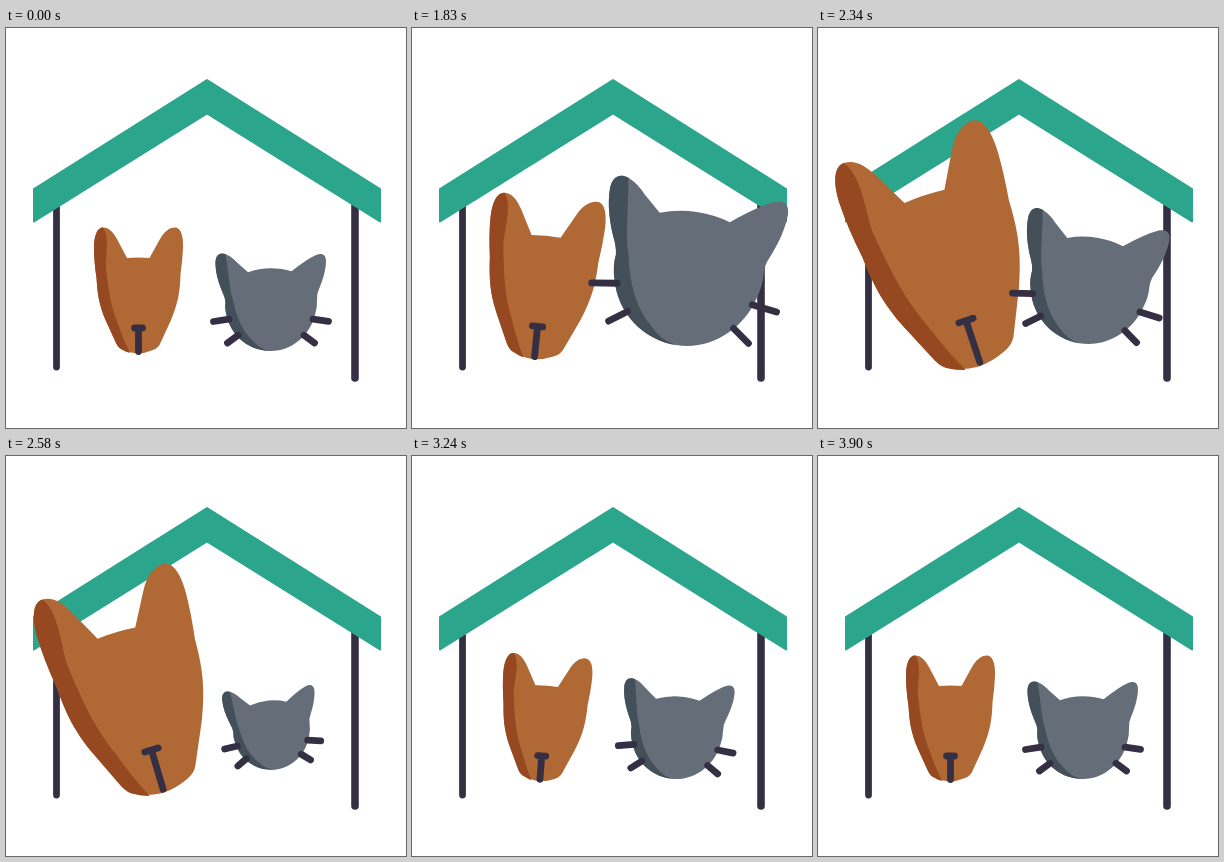
Animation of 400 by 400 pixels, one loop 3.93 s. Source, as an HTML page:

```html
<!DOCTYPE html>
<html lang="en">
<head>
<meta charset="utf-8">
<title>Pet shelter</title>
<style>
  html, body { margin: 0; width: 100%; height: 100%; overflow: hidden; background: #fff; }
  svg { display: block; width: 100vw; height: 100vh; }
  .line { fill: none; stroke: #352f44; stroke-width: 6.8; stroke-linecap: round; vector-effect: non-scaling-stroke; }
  .right { stroke-width: 7.6; }
</style>
</head>
<body>
<svg viewBox="0 0 400 400">
  <path class="line" d="M50.5 175V339"/>
  <path class="line right" d="M349 175V350"/>
  <path fill="#2ca58d" stroke="#2ca58d" stroke-width="2" stroke-linejoin="round"
    d="M201 52L374 161V193.500L201 85.300L28 193.500V161Z"/>
  <g id="dog">
    <path fill="#b06835" d="M97 199.500C103 199.500 107 204 111 211L121 230Q132 229 143.500 230L154 211C158 204 163 199.500 169 199.500C174.500 199.500 177.500 207 177 220Q176.500 232 174.500 246C174 264 172 275 165 292L154 316Q152 320 147 322Q139 325.500 131 325.500Q123 325 116 321.500Q112.500 320 110 315L100 293C93 277 91.500 266 90.500 250Q88 233 88 220C88 207 91.500 199.500 97 199.500Z"/>
    <path fill="#964820" d="M97 199.500C91.500 199.500 88 207 88 220Q88 233 90.500 250C91.500 266 93 277 100 293L110 315Q112.500 320 116 321.500Q119 323.500 124 325Q118 313 112 296C105 279 102.500 263 100 240C99.500 228 104 209 97 199.500Z"/>
    <path class="line" d="M128.500 300H136.500M132.500 300V323.500"/>
  </g>
  <g id="cat">
    <path fill="#656e78" d="M216 225.500C221 225.500 227 230 231 234.500L242 244.300Q253 240.300 264.500 240.300Q276 240.300 285.500 243.300Q301 231 310 227C316 224.500 320 226.500 320 233C320 241 317 252 313 261Q310.500 266 311 272Q311.500 279 309 287C304 307 286 323 265 323C244 323 226 309 221 289Q218.500 281 219.500 274Q219 269 216 263C212 253 209.500 244 209.500 235C209.500 229 212 225.500 216 225.500Z"/>
    <path fill="#434f59" d="M216 225.500C212 225.500 209.500 229 209.500 235C209.500 244 212 253 216 263Q219 269 219.500 274Q218.500 281 221 289C226 309 244 323 265 323Q255 322 247 313C236 303 230 288 227 272C223 260 223 246 219.500 226Z"/>
    <path class="line" d="M207.500 293.500L223 291.200M221.500 315L232 307.300M307 291.200L322.500 293.300M298 307.300L308.500 315"/>
  </g>
</svg>
<script>
  const LOOP = 3930, HOLD = 1530, STEP = 30;
  const dog = document.getElementById('dog');
  const cat = document.getElementById('cat');

  // Eased 0 to 1 between steps a and b.
  function ease(n, a, b) {
    const u = Math.min(1, Math.max(0, (n - a) / (b - a)));
    return u * u * (3 - 2 * u);
  }

  // Place a head by its centre, turned and scaled about it.
  function pose(pet, cx, cy, dx, dy, turn, size) {
    pet.setAttribute('transform',
      `translate(${cx + dx} ${cy + dy}) rotate(${turn}) scale(${size}) translate(${-cx} ${-cy})`);
  }

  function moveDog(n) {
    const swell = 0.87 * (ease(n, 4, 22) - ease(n, 29, 58));
    const turn = 5.8 * ease(n, 2, 12) - 24.1 * ease(n, 12, 28)
      + 22.9 * ease(n, 31, 60) - 4.6 * ease(n, 60, 80);
    pose(dog, 132.5, 262.5, -7.5 * swell, -42 * swell, turn, 1 + swell);
  }

  function moveCat(n) {
    const grow = ease(n, 0, 12), shrink = ease(n, 20, 38);
    const lift = grow - shrink;
    const size = 1 + 0.64 * grow - 0.83 * shrink + 0.19 * ease(n, 38, 56);
    const turn = -6 * ease(n, 0, 4) + 27 * ease(n, 4, 17) - 28.5 * ease(n, 19, 40)
      + 11.7 * ease(n, 40, 60) - 4.2 * ease(n, 60, 80);
    pose(cat, 264.5, 274, 12 * lift, -36.5 * lift, turn, size);
  }

  function draw(ms) {
    const t = ms % LOOP;
    const n = t < HOLD ? 0 : 1 + Math.floor((t - HOLD) / STEP);
    moveDog(n);
    moveCat(n);
  }

  const start = performance.now();
  function tick() {
    draw(performance.now() - start);
    requestAnimationFrame(tick);
  }
  tick();
</script>
</body>
</html>
```
